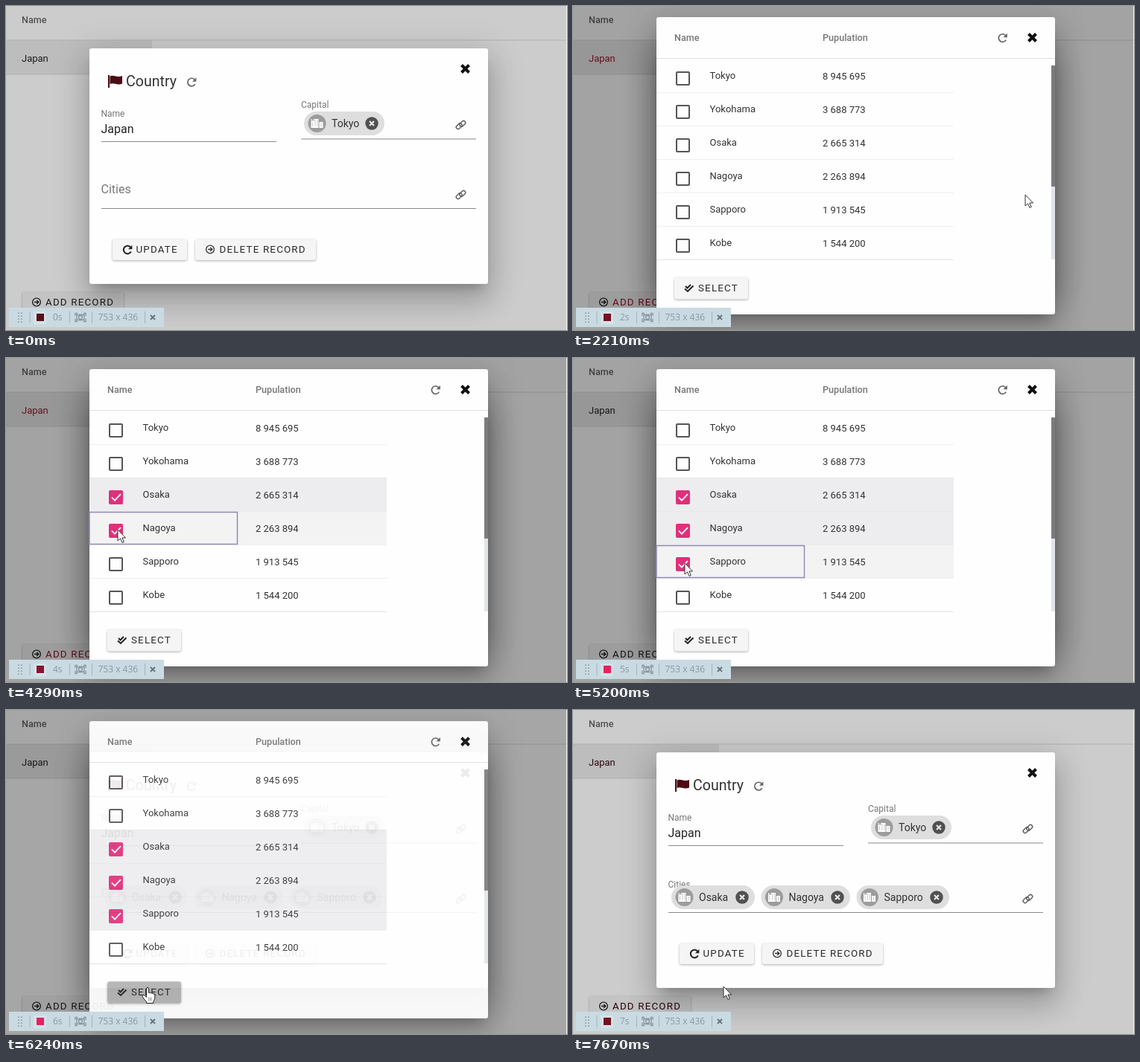
Write an HTML page that moves like this. It is 753x436 px and loops after 8.32 s.

```html
<!DOCTYPE html>
<html lang="en">
<head>
<meta charset="utf-8">
<title>Country record</title>
<style>
  html, body { margin: 0; width: 100%; height: 100%; overflow: hidden; background: #fff; }
  svg { display: block; width: 753px; height: 436px; font-family: Roboto, "Liberation Sans", sans-serif; }
  .head { font-size: 12.6px; font-weight: 500; }
  .cell { font-size: 13px; }
  .btn { font-size: 13.33px; letter-spacing: 1.2px; }
  .raised { filter: drop-shadow(0 1.5px 1.5px rgba(0,0,0,.32)); }
  .tool { font: 12px "Open Sans", "Noto Sans", sans-serif; fill: #8c989e; }
</style>
</head>
<body>
<svg id="stage" viewBox="0 0 753 436"></svg>
<script>
const LOOP = 8320, STEP = 130;
const CITIES = [["Tokyo", "8 945 695"], ["Yokohama", "3 688 773"], ["Osaka", "2 665 314"],
  ["Nagoya", "2 263 894"], ["Sapporo", "1 913 545"], ["Kobe", "1 544 200"]];
const CHECK_TIMES = { 2: 3510, 3: 4160, 4: 5070 };

const rect = (x, y, w, h, fill, extra = "") =>
  `<rect x="${x}" y="${y}" width="${w}" height="${h}" fill="${fill}" ${extra}/>`;
const text = (x, y, s, fill, extra = "") => `<text x="${x}" y="${y}" fill="${fill}" ${extra}>${s}</text>`;
const at = (x, y, body, extra = "") => `<g transform="translate(${x} ${y})" ${extra}>${body}</g>`;
const stroke = (d, color, width, extra = "") =>
  `<path d="${d}" fill="none" stroke="${color}" stroke-width="${width}" ${extra}/>`;

const refresh = (x, y, color, width = 1.7) => at(x, y,
  stroke("M4.4 -3.1A5.3 5.3 0 1 0 4.8 2.6", color, width) + `<path d="M6.4 -6.2V-.8H1Z" fill="${color}"/>`);
const cross = (x, y, r, width, extra = 'stroke="#111"') => at(x, y,
  `<path d="M${-r} ${-r}L${r} ${r}M${r} ${-r}L${-r} ${r}" stroke-width="${width}" ${extra}/>`);
const arrowCircle = (x, y, color) => at(x, y,
  `<circle r="5.4" fill="none" stroke="${color}" stroke-width="1.3"/>` + stroke("M-3 0H2.6M.2 -2.6L2.8 0L.2 2.6", color, 1.4));
const link = (x, y) => at(x, y, `<g transform="rotate(-45)" fill="none" stroke="#666" stroke-width="1.6">
  <rect x="-7.2" y="-3" width="8.8" height="5" rx="2.5"/><rect x="-1.6" y="-2" width="8.8" height="5" rx="2.5"/></g>`);

const skyline = rect(-8, -3, 5, 9, "#fff") + rect(-4, -6, 6, 12, "#fff") + rect(3, -2, 5, 8, "#fff") +
  stroke("M-6 -1V4M-2.5 -4V4M.5 -4V4M5.5 0V4", "#aaa", 1, 'stroke-dasharray="1.6 1"') + stroke("M-7.5 -6V-3M-5.5 -5V-3", "#fff", 1);
const chip = (x, y, w, name) => rect(x, y - 16, w, 32, "#dedede", 'rx="16"') +
  at(x + 17.5, y, `<circle r="12" fill="#9c9c9c"/>` + skyline) +
  text(x + 37, y + 5, name, "#333", 'font-size="14"') +
  `<circle cx="${x + w - 17}" cy="${y}" r="8.7" fill="#505050"/>` + cross(x + w - 17, y, 3, 2.3, 'stroke="#e4e4e4"');

const button = (x, y, w, h, label, textX, textY, cls = "") =>
  rect(x, y, w, h, "#f5f5f5", `rx="3" class="raised" ${cls}`) + text(textX, textY, label, "#2a2a2a", 'class="btn tint"');

// Shadow layers: vertical offset, blur, spread, opacity
const dialog = (x, y, w, h) => [[11, 15, -7, .2], [24, 38, 3, .14], [9, 46, 8, .12]].map(([dy, blur, s, a]) =>
  rect(x - s, y + dy - s, w + 2 * s, h + 2 * s, "#000", `opacity="${a}" style="filter:blur(${blur / 2}px)"`)).join("") +
  rect(x, y, w, h, "#fefefe", 'rx="3"');

const page = rect(0, 0, 753, 436, "#fff") + rect(0, 46, 196, 46, "#ececec") +
  rect(0, 45.5, 753, 1, "#dcdcdc") + rect(0, 91.5, 196, 1, "#e0e0e0") +
  text(21, 23, "Name", "#666", 'class="head"') + text(21, 75, "Japan", "#222", 'class="cell tint"') +
  button(22, 385, 136, 27, "ADD RECORD", 53, 403) + arrowCircle(41, 398.5, "#222");

const form = dialog(112, 57, 535, 317) +
  `<path d="M137 93h2v17h-2zM139.5 94.5c5-2.5 9 2.5 16.5-.5v10.500c-7 3-11-2-16.500 .5z" fill="#4c0b15"/>` +
  text(161, 108, "Country", "#333", 'font-size="19.600"') + refresh(249, 102.500, "#666") + cross(616.500, 84.500, 5, 4) +
  text(127.500, 149, "Name", "#777", 'font-size="12"') + text(127.500, 171, "Japan", "#222", 'font-size="16"') +
  rect(128, 182, 235, 1, "#8c8c8c") + text(396, 137, "Capital", "#777", 'font-size="12"') +
  chip(400, 158, 108, "Tokyo") + link(610.500, 160) + rect(396, 178.500, 235, 1, "#8c8c8c") +
  text(127.500, 252, "Cities", "#777", 'id="label"') +
  `<g id="chips">${chip(132, 252, 112, "Osaka") + chip(252.500, 252, 119.500, "Nagoya") + chip(380.500, 252, 124.500, "Sapporo")}</g>` +
  `<circle id="halo" cx="613.500" cy="254" r="17.500" fill="#d9d9db"/>` + link(610.500, 254) +
  rect(128, 272, 503, 1, "#8c8c8c", 'id="line"') + rect(380, 271, 0, 2, "#222", 'id="focusLine"') +
  button(143, 314, 100, 28, "UPDATE", 174.500, 332) + refresh(163, 328, "#222", 2) +
  button(254, 314, 162, 28, "DELETE RECORD", 286.500, 332) + arrowCircle(274, 327.500, "#333");

const row = ([name, population], i) => {
  const top = 71.500 + 45 * i;
  return rect(112, top, 399, 45, "#fefefe", `id="row${i}"`) + rect(112, top + 44.500, 399, 1, "#e2e2e4") +
    rect(139, top + 17.500, 17, 17, "#fefefe", `id="box${i}" stroke="#555" stroke-width="2" rx="1"`) +
    stroke(`M142 ${top + 26}l4 4.200 8-8.500`, "#fff", 1.800, `id="tick${i}"`) +
    text(183.500, top + 26.500, name, "#333", 'class="cell"') + text(335, top + 27.500, population, "#333", 'class="cell"');
};

const list = rect(0, 0, 753, 436, "#000", 'opacity=".2"') + dialog(112, 15, 535, 400) +
  text(136, 47, "Name", "#777", 'class="head"') + text(335, 47, "Pupulation", "#777", 'class="head"') +
  refresh(576.500, 43, "#666") + cross(616.500, 42.500, 5, 4) + rect(112, 70, 535, 1, "#e0e0e2") +
  CITIES.map(row).join("") +
  rect(112, 207.500, 198.500, 43, "none", 'id="outline" stroke="#8f8cb4" stroke-width="1.500"') +
  rect(642, 80, 5, 261, "#e1e5e9") + rect(642, 80, 5, 163, "#7b7b7d") +
  button(136, 365.500, 99, 29, "SELECT", 168, 384, 'id="select"') +
  `<clipPath id="selectClip"><rect x="136" y="365.500" width="99" height="29" rx="3"/></clipPath>
   <circle id="ripple" cx="190" cy="380" r="0" fill="#000" opacity=".2" clip-path="url(#selectClip)"/>` +
  stroke("M151 377l2.500 2.500 4.500-4.500M150 380.500l4 3.500 7.500-7.500", "#222", 2);

const toolbar = rect(4, 406, 208, 26, "#c9dae2") + rect(37, 411, 17, 17, "#d5e2e8") +
  stroke("M17 412.500V427M21 412.500V427", "#86939a", 1.600, 'stroke-dasharray="1.600 2.400"') +
  stroke("M32 411V427M85.500 411V427M115.500 411V427M186.500 411V427", "#a5b3ba", 1) +
  rect(41, 414, 10, 10, "#5a0f16", 'id="record"') + text(63, 423, "0s", "", 'class="tool" id="seconds"') +
  stroke("M96 413.500H93V417M104 413.500H107V417M93 421V424.500H96M107 421V424.500H104M95 415.500H105V422.500H95Z", "#87949a", 1.300) +
  `<circle cx="100" cy="419" r="2.500" fill="none" stroke="#87949a" stroke-width="1.300"/>` +
  text(123.500, 423, "753 x 436", "", 'class="tool"') + cross(197, 419, 3, 1.800, 'stroke="#66737a"');

const cursors = `<g id="arrow"><path d="M0 0V15L3.500 11.800L6 17.500L8.300 16.500L5.900 11H10.500Z" fill="#fff" stroke="#333"/></g>
  <g id="hand"><path d="M-1.500 11V1.500Q-1.500 0 0 0Q1.600 0 1.600 1.500V7Q3.200 5.800 4.500 7.500Q6 6.500 7.200 8.300Q9.800 7.500 9.800 10V14Q9.500 17 7.800 18.500V21H-1.500V19Q-5 15.500-7 12Q-7.300 9.800-5 10Q-3.500 11-1.500 13Z" fill="#fff" stroke="#222"/>
  <path d="M2 13V18M4.500 13V18" stroke="#777"/></g>`;

document.getElementById("stage").innerHTML = page + rect(0, 0, 752, 436, "#000", 'opacity=".2"') + form +
  `<g id="list">${list}</g>` + rect(752, 0, 1, 436, "#f2f2f2") + toolbar + cursors;

const $ = id => document.getElementById(id);
const set = (id, attrs) => { for (const k in attrs) $(id).setAttribute(k, attrs[k]); };
const show = (id, on) => { $(id).style.display = on ? "" : "none"; };
const tinted = document.querySelectorAll(".tint");

function tween(keys, t) {
  const n = keys.findIndex(k => k[0] > t);
  if (n < 0) return keys[keys.length - 1].slice(1);
  if (n === 0) return keys[0].slice(1);
  const a = keys[n - 1], b = keys[n], p = (t - a[0]) / (b[0] - a[0]);
  return a.slice(1).map((v, i) => v + (b[i + 1] - v) * p);
}
const hold = (keys, t) => keys.filter(k => k[0] <= t).pop()[1];

const POINTER = [[780, 560, 310], [1040, 590, 260], [1430, 590, 260], [1690, 607, 254], [2600, 607, 254],
  [2990, 232, 226], [3380, 150, 186], [3640, 150, 186], [4030, 150, 231], [4420, 150, 231],
  [4940, 150, 276], [5330, 150, 276], [5850, 190, 373.500], [6370, 190, 373.500], [6890, 202, 372]];
const RECORD = [[0, "#5a0f16"], [1040, "#420206"], [2080, "#7c0f22"], [3510, "#8c1230"],
  [4550, "#e8215e"], [6370, "#420206"], [7280, "#7a1020"]];
const TINT = [[0, "#222"], [2080, "#98182e"], [4550, "#222"], [6370, "#35090f"]];
const LIST_FADE = [[1950, 0], [2080, .55], [2210, 1], [6110, 1], [6240, .92], [6370, .03], [6500, 0]];
const LABEL_LIFT = [[1690, 0], [1820, .6], [1950, 1], [2210, 1], [2340, 0], [6240, 0], [6370, .6], [6500, 1]];

function draw(t) {
  const [x, y] = tween(POINTER, t);
  const handOn = (t >= 1690 && t < 2210) || (t >= 5850 && t < 6500);
  show("arrow", t >= 780 && !handOn);
  show("hand", handOn);
  for (const id of ["arrow", "hand"]) set(id, { transform: `translate(${x} ${y})` });

  const [lift] = tween(LABEL_LIFT, t);
  set("label", { y: 252 - 13 * lift, "font-size": 16 - 4 * lift });
  show("chips", t >= 6240);
  show("halo", t >= 1690 && t < 2340);
  set("line", { fill: t >= 910 && t < 2340 ? "#333" : "#8c8c8c" });
  const [half] = tween([[1820, 0], [1950, 162], [2080, 251.500]], t);
  set("focusLine", { x: 379.500 - half, width: t < 2340 ? half * 2 : 0 });

  const [fade] = tween(LIST_FADE, t);
  set("list", { opacity: fade });
  show("list", fade > 0);

  const hovered = t >= 2470 && x < 511 ? Math.floor((y - 71.500) / 45) : -1;
  CITIES.forEach((_, i) => {
    const checked = t >= CHECK_TIMES[i], hover = i === hovered;
    set("row" + i, { fill: checked ? (hover ? "#f3f3f4" : "#ededef") : hover ? "#fafafa" : "#fefefe" });
    set("box" + i, { fill: checked ? "#e0307a" : "none", stroke: checked ? "#e0307a" : "#555" });
    show("tick" + i, checked);
  });
  const focused = hold([[0, -1], [3510, 2], [4160, 3], [5070, 4], [5850, -1]], t);
  show("outline", focused >= 0);
  set("outline", { y: 72.500 + 45 * focused });

  set("select", { fill: t >= 5850 ? "#dedede" : "#f5f5f5" });
  set("ripple", { r: tween([[5980, 0], [6110, 21], [6240, 55]], t)[0] });

  const tint = hold(TINT, t);
  tinted.forEach((el, i) => { if (i < 2) el.setAttribute("fill", tint); });
  set("record", { fill: hold(RECORD, t) });
  $("seconds").textContent = Math.floor(t / 1040) + "s";
}

const start = performance.now();
function tick() {
  const t = (performance.now() - start) % LOOP;
  draw(Math.floor(t / STEP) * STEP);
  requestAnimationFrame(tick);
}
draw(0);
requestAnimationFrame(tick);
</script>
</body>
</html>
```
